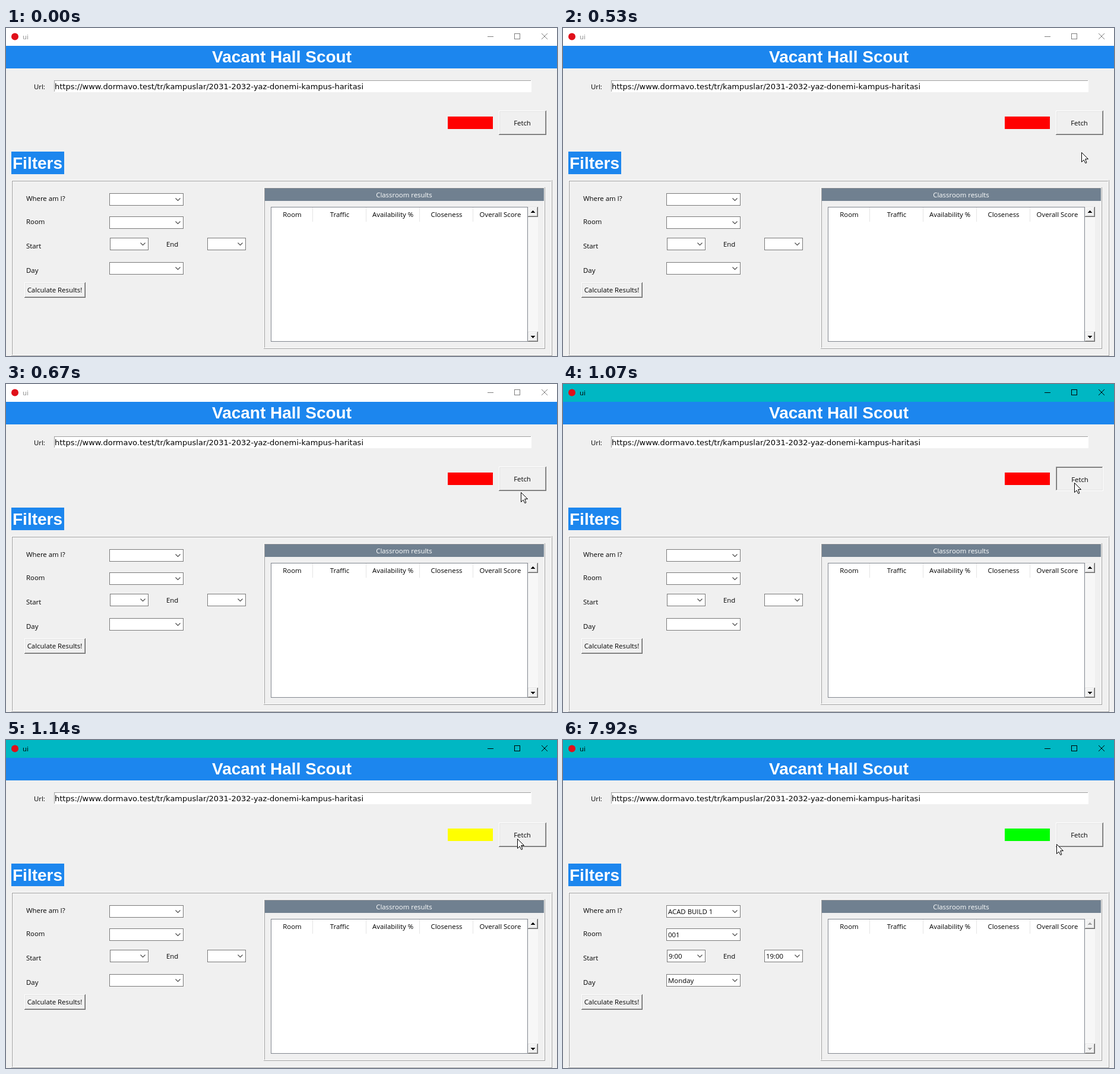
An HTML page with a canvas that plays this animation: 928 by 552 pixels, repeating every 7.99 s.

```html
<!DOCTYPE html>
<html lang="en">
<head>
<meta charset="utf-8">
<title>Room search</title>
<style>
  html, body { margin: 0; width: 100%; height: 100%; overflow: hidden; background: #f0f0f0; }
  canvas { display: block; }
</style>
</head>
<body>
<canvas id="stage" width="928" height="552"></canvas>
<script>
const ctx = document.getElementById('stage').getContext('2d');

const LOOP = 7990, PRESS = 1070, RELEASE = 1140, LOADED = 6740;
const FACE = '#f0f0f0', BLUE = '#1c86ee', SHADOW = '#a0a0a0', DARK = '#696969', LIGHT = '#e3e3e3';
const UI = '11.4px "Open Sans", sans-serif';
const HEADING = 'bold 28px "Liberation Sans", Arial, sans-serif';
const ENTRY = '13px "DejaVu Sans", sans-serif';

// Pointer stops: time, x, y of the tip
const POINTER = [
  [210, 859, 430], [290, 863, 355], [370, 868, 290], [450, 871, 242], [530, 873, 209],
  [590, 871, 196], [670, 867, 182], [750, 862, 172], [820, 861, 166], [7920, 831, 175]
];

function rect(x, y, w, h, color) {
  ctx.fillStyle = color;
  ctx.fillRect(x, y, w, h);
}

function text(str, x, y, { font = UI, color = '#000', align = 'left' } = {}) {
  ctx.font = font;
  ctx.fillStyle = color;
  ctx.textAlign = align;
  ctx.fillText(str, x, y);
}

function path(points, closed) {
  ctx.beginPath();
  points.forEach(([x, y]) => ctx.lineTo(x, y));
  if (closed) ctx.closePath();
}

function line(points, color, width = 1) {
  path(points);
  ctx.strokeStyle = color;
  ctx.lineWidth = width;
  ctx.stroke();
}

function edge(x, y, w, h, topLeft, bottomRight) {
  rect(x, y, w, 1, topLeft);
  rect(x, y, 1, h, topLeft);
  rect(x, y + h - 1, w, 1, bottomRight);
  rect(x + w - 1, y, 1, h, bottomRight);
}

function ridge(x, y, w, h) {
  edge(x, y, w, h, '#fff', SHADOW);
  edge(x + 1, y + 1, w - 2, h - 2, SHADOW, '#fff');
}

function raised(x, y, w, h, outer = '#fff', inner = LIGHT) {
  rect(x, y, w, h, FACE);
  edge(x, y, w, h, outer, DARK);
  edge(x + 1, y + 1, w - 2, h - 2, inner, SHADOW);
}

function sunken(x, y, w, h) {
  rect(x, y, w, h, FACE);
  edge(x, y, w, h, SHADOW, '#fff');
  edge(x + 1, y + 1, w - 2, h - 2, DARK, LIGHT);
}

function titleBar(active) {
  const ink = active ? '#000' : '#7f7f7f';
  rect(0, 0, 928, 30, active ? '#00b7c3' : '#fff');
  ctx.fillStyle = '#e0101a';
  ctx.beginPath();
  ctx.arc(15, 14.5, 6, 0, Math.PI * 2);
  ctx.fill();
  text('ui', 28, 19, { color: active ? '#000' : '#8c8c8c' });
  rect(811, 14, 10, 1, ink);
  edge(856, 9, 10, 10, ink, ink);
  line([[902, 9], [912, 19]], ink);
  line([[912, 9], [902, 19]], ink);
}

function combo(x, y, w, value) {
  rect(x, y, w, 21, '#fff');
  edge(x, y, w, 21, '#7a7a7a', '#7a7a7a');
  const cx = x + w - 9.5, cy = y + 10.5;
  line([[cx - 4, cy - 2], [cx, cy + 2], [cx + 4, cy - 2]], '#484848', 1.1);
  text(value, x + 3, y + 15);
}

function triangle(cx, cy, dir, color) {
  for (let i = 0; i < 4; i++) rect(cx - i, cy + dir * (2 - i), 2 * i + 1, 1, color);
}

function scrollButton(y, dir, enabled) {
  raised(879, y, 17, 17, LIGHT, '#fff');
  if (!enabled) triangle(888, y + 9, dir, '#fff');
  triangle(887, y + 8, dir, enabled ? '#000' : SHADOW);
}

function results(enabled) {
  ridge(434, 268, 474, 272);
  rect(436, 270, 470, 21, '#708090');
  text('Classroom results', 670.5, 285, { color: '#fff', align: 'center' });

  rect(446, 301, 433, 227, '#fff');
  [516, 606, 696, 786].forEach(x => rect(x, 302, 1, 24, '#e5e5e5'));
  edge(446, 301, 433, 227, '#828790', '#828790');
  [['Room', 482], ['Traffic', 562], ['Availability %', 651.5], ['Closeness', 742], ['Overall Score', 832.5]]
    .forEach(([name, x]) => text(name, x, 318, { align: 'center' }));

  rect(879, 301, 17, 227, '#f7f7f7');
  scrollButton(301, -1, enabled);
  scrollButton(511, 1, enabled);
}

function fetchButton(pressed) {
  (pressed ? sunken : raised)(830, 139, 80, 41);
  const shift = pressed ? 1 : 0;
  text('Fetch', 869.5 + shift, 164 + shift, { align: 'center' });
}

function filters(loaded) {
  rect(9, 208, 89, 38, BLUE);
  text('Filters', 11, 237, { font: HEADING, color: '#fff' });
  ridge(9, 256, 911, 296);

  [['Where am I?', 34, 291], ['Room', 34, 330], ['Start', 34, 371], ['End', 270, 368], ['Day', 34, 412]]
    .forEach(label => text(...label));
  [
    [174, 278, 125, 'ACAD BUILD 1'], [174, 317, 125, '001'],
    [175, 353, 65, '9:00'], [339, 353, 65, '19:00'], [174, 394, 125, 'Monday']
  ].forEach(([x, y, w, value]) => combo(x, y, w, loaded ? value : ''));

  raised(31, 428, 103, 26);
  text('Calculate Results!', 82, 445, { align: 'center' });
}

function pointer(time) {
  const stop = POINTER.filter(([start]) => start <= time).pop();
  if (!stop) return;
  ctx.save();
  ctx.translate(stop[1] + 0.5, stop[2] + 0.5);
  path([[0, 0], [0, 16], [3.6, 12.5], [6.4, 18], [8.4, 17.2], [6.2, 11], [11, 11]], true);
  ctx.fillStyle = '#fff';
  ctx.fill();
  ctx.strokeStyle = '#000';
  ctx.lineWidth = 1;
  ctx.lineJoin = 'round';
  ctx.stroke();
  ctx.restore();
}

function draw(time) {
  const loaded = time >= LOADED;
  const status = loaded ? '#0f0' : time >= RELEASE ? '#ff0' : '#f00';

  rect(0, 0, 928, 552, FACE);
  titleBar(time >= PRESS);
  rect(0, 30, 928, 38, BLUE);
  text('Vacant Hall Scout', 464.5, 58, { font: HEADING, color: '#fff', align: 'center' });

  text('Url:', 47, 103);
  rect(81, 88, 804, 20, '#fff');
  edge(81, 88, 804, 20, SHADOW, '#fff');
  text('https://www.dormavo.test/tr/kampuslar/2031-2032-yaz-donemi-kampus-haritasi', 82, 103, { font: ENTRY });

  rect(744, 149, 76, 21, status);
  fetchButton(time >= PRESS && time < RELEASE);
  filters(loaded);
  results(!loaded);
  pointer(time);
}

const begin = performance.now();
function tick() {
  draw((performance.now() - begin) % LOOP);
  requestAnimationFrame(tick);
}
tick();
</script>
</body>
</html>
```
